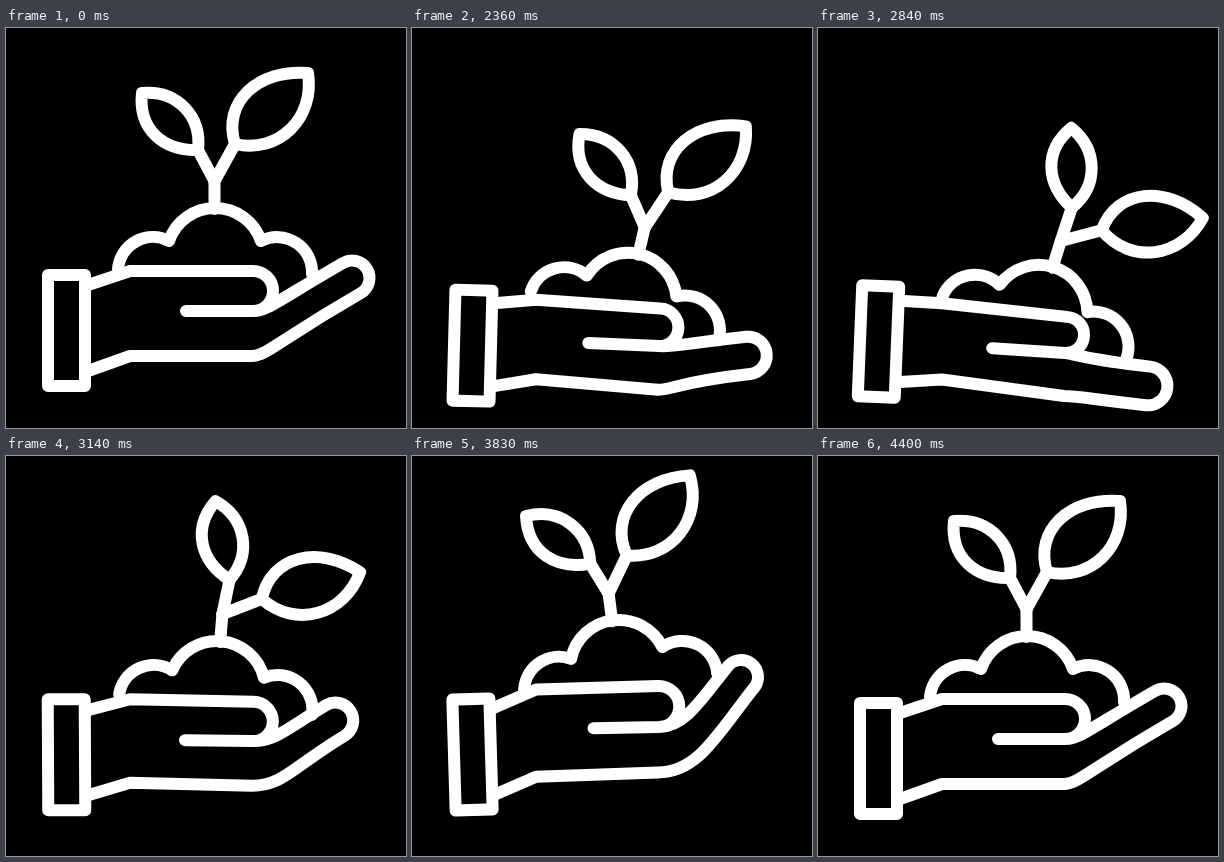
Recreate the animation shown at these times as an HTML page. Size 400 by 400 pixels, loop 4.43 s.

```html
<!DOCTYPE html>
<html lang="en">
<head>
<meta charset="utf-8">
<title>Hand with seedling</title>
<style>
html, body { margin: 0; width: 100%; height: 100%; overflow: hidden; background: #000; }
svg { display: block; width: 100%; height: 100%; }
</style>
</head>
<body>
<svg viewBox="0 0 400 400" fill="none" stroke="#fff" stroke-width="12" stroke-linecap="round" stroke-linejoin="round">
  <g id="arm">
    <rect id="cuff" x="42" y="247" width="37" height="111"/>
    <path id="hand"/>
    <g id="plant">
      <path d="M112 241A35 35 0 0 1 163 213A48.6 48.6 0 0 1 255 213A35 35 0 0 1 306 246M208.5 181V153"/>
      <g id="twigL">
        <path d="M208.5 153L192 122"/>
        <path id="leafL" d="M136 65C132 102 158 123 192 122C196 88 171 62 136 65Z"/>
      </g>
      <g id="twigR">
        <path d="M208.5 153L229 116"/>
        <path id="leafR" d="M302 45C252 41 216 74 229 116C273 126 309 90 302 45Z"/>
      </g>
    </g>
  </g>
</svg>
<script>
const LOOP = 4430, START = 2030, STEP = 30, HOLD = 3830, END = 4400;

const $ = id => document.getElementById(id);
const turn = (id, angle, x, y) => $(id).setAttribute('transform', `rotate(${angle} ${x} ${y})`);

// Sine easing through [time, value] keys, constant outside them.
function ease(t, ...keys) {
  let [t0, v0] = keys[0];
  for (const [t1, v1] of keys) {
    if (t < t1) {
      const u = Math.max(0, (t - t0) / (t1 - t0));
      return v0 + (v1 - v0) * (1 - Math.cos(Math.PI * u)) / 2;
    }
    [t0, v0] = [t1, v1];
  }
  return v0;
}

// Hand outline for a given droop (down) and curl (fingers inward).
function outline(droop, curl) {
  const wrist = 257 + 5 * droop, bend = 243 + 22 * droop;
  const top = [247 + 2 * droop, 243 + 36 * droop];
  const low = [247, 283 + 32 * droop];
  const heel = [246, 328 + 30 * droop];

  // The finger tip is a half circle turned by the finger's angle.
  const a = (-30 + 38 * droop - 12 * curl) * Math.PI / 180;
  const dir = [Math.cos(a), Math.sin(a)];
  const r = 17.5 + 2 * droop;
  const tip = [346 - 16 * droop - 21 * curl, 250 + 100 * droop];
  const side = s => [tip[0] + s * r * dir[1], tip[1] - s * r * dir[0]];
  const upper = side(1), lower = side(-1);

  // Handle that runs back along the finger from p towards the root q.
  const back = (p, q) => {
    const reach = Math.hypot(p[0] - q[0], p[1] - q[1]) * (.77 - .3 * curl);
    return [p[0] - dir[0] * reach, p[1] - dir[1] * reach];
  };
  const thumb = (low[1] - top[1]) / 2;

  return `M82 ${wrist}L124 ${bend}L${top}A${thumb} ${thumb} 0 0 1 ${low}` +
    `L${180 - 6 * droop} ${283 + 27 * droop}` +
    `M${low}C${low[0] + 14 + 12 * curl} ${low[1] + 2 * droop} ${back(upper, low)} ${upper}` +
    `A${r} ${r} 0 0 1 ${lower}` +
    `C${back(lower, heel)} ${heel[0] + 14 + 26 * curl} ${heel[1]} ${heel}` +
    `L124 ${328 + 13 * droop}L82 343`;
}

function draw(t) {
  const bob = ease(t, [START, 0], [2560, 22], [3180, -4], [HOLD, -4], [END, 0]);
  const droop = ease(t, [START, 0], [2600, 1], [2780, 1], [3380, -.25], [HOLD, -.25], [END, 0]);
  const curl = ease(t, [2780, 0], [3380, 1], [HOLD, 1], [END, 0]);
  const sway = ease(t, [2220, 0], [2900, 1], [3720, -.2], [HOLD, -.2], [END, 0]);

  $('arm').setAttribute('transform', `translate(0 ${bob})`);
  turn('cuff', 2.4 * droop - 1.1 * curl, 60.5, 302.5);
  $('hand').setAttribute('d', outline(droop, curl));

  const lean = droop * (27 - 9.5 * droop);
  const twig = 47 * sway + 6 * curl;
  $('plant').setAttribute('transform',
    `translate(${17 * droop} ${48 * droop}) rotate(${lean} 209 213)`);
  turn('twigL', twig - lean, 208.5, 153);
  turn('twigR', twig - lean, 208.5, 153);
  turn('leafL', 45 * sway - twig, 192, 122);
  turn('leafR', 38 * sway - twig, 229, 116);
}

const t0 = performance.now();
function tick() {
  const t = (performance.now() - t0) % LOOP;
  draw(t < START ? 0 : START + Math.floor((t - START) / STEP) * STEP);
  requestAnimationFrame(tick);
}
tick();
</script>
</body>
</html>
```
